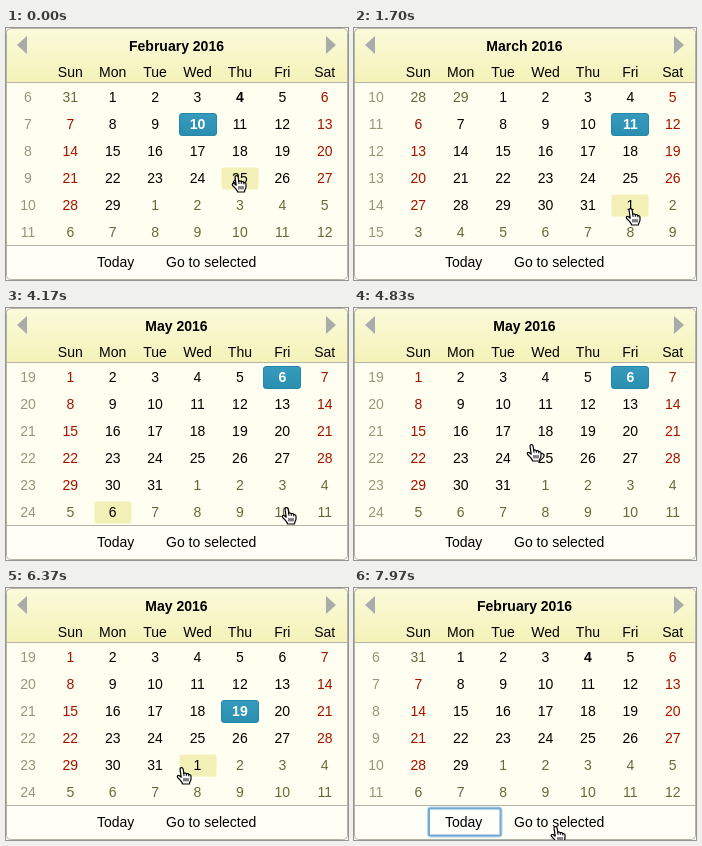
An HTML page that plays this animation: 342x252 px, repeating every 8000 ms.

```html
<!DOCTYPE html>
<html lang="en">
<head>
<meta charset="utf-8">
<title>Date picker</title>
<style>
html, body { margin: 0; width: 100%; height: 100%; overflow: hidden; background: #fff; }
svg { display: block; width: 342px; height: 252px; font: 14px "Liberation Sans", Arial, sans-serif; }
.mid { text-anchor: middle; }
.bold, .today, .sel { font-weight: bold; }
.week { fill: #97977c; }
.weekend { fill: #a61200; }
.other { fill: #68683f; }
.hover { fill: #000; }
.sel { fill: #fff; }
rect.hover { fill: #f2f0b6; }
rect.sel { fill: url(#blue); stroke: #2787a8; }
rect.plain { fill: none; }
.line { stroke: #b4b4a6; fill: none; }
</style>
</head>
<body>
<svg id="stage" viewBox="0 0 342 252">
  <defs>
    <linearGradient id="head" x2="0" y2="1">
      <stop stop-color="#fbfadb"/><stop offset="1" stop-color="#f4f2b8"/>
    </linearGradient>
    <linearGradient id="blue" x2="0" y2="1">
      <stop stop-color="#379bbd"/><stop offset="1" stop-color="#2a8eb0"/>
    </linearGradient>
    <clipPath id="frame"><rect x=".5" y=".5" width="341" height="251" rx="4"/></clipPath>
  </defs>
  <g clip-path="url(#frame)">
    <rect width="342" height="252" fill="#fffff1"/>
    <rect width="342" height="55" fill="url(#head)"/>
    <rect y="217" width="342" height="35" fill="#fffff8"/>
    <path class="line" d="M0 54.5H342M0 217.5H342"/>
  </g>
  <rect class="line" x=".5" y=".5" width="341" height="251" rx="4"/>
  <path fill="#aaa" d="M11 17L21 8V26ZM330 17L320 8V26Z"/>
  <text id="title" class="mid bold" x="170.5" y="23"></text>
  <g id="grid"></g>
  <g id="focus" fill="none">
    <rect x="75" y="220.5" width="71.5" height="27" rx="2" stroke="#b9d6ec" stroke-width="4"/>
    <rect x="75" y="220.5" width="71.5" height="27" rx="1" fill="#fffffa" stroke="#74aad6" stroke-width="2"/>
  </g>
  <text x="91" y="239">Today</text>
  <text x="160" y="239">Go to selected</text>
  <g id="hand" stroke="#000" stroke-linejoin="round" stroke-linecap="round">
    <path fill="#fff" stroke-width="1.2" d="M4 2C4 .2 6.8 .2 7.1 2L7.8 6.4C8.6 5.6 10 5.9 10.3 6.9C11.2 6.2 12.5 6.6 12.8 7.7C14 7.3 15 8 15 9.4V12C15 13.6 13.6 14.6 13.4 17H6.6C6.4 15 3.6 12.8 1.6 10.4C.6 9 2 7.9 3.4 8.8L5.2 10.2Z"/>
    <path fill="none" d="M8 11.5V14M10 11.5V14M12 11.5V14M7.8 6.4L8 8.5M10.3 6.9V8.5M12.8 7.7V9"/>
  </g>
</svg>
<script>
const LOOP = 8000, DAY = 864e5, YEAR = 2016;
const MONTHS = ['January', 'February', 'March', 'April', 'May'];
const $ = id => document.getElementById(id);
const colX = c => 64.3 + 42.4 * c, rowY = r => 69 + 27 * r;

// time, x, y of the hand
const path = [
  [0, 225, 147], [200, 225, 147], [870, 263, 193], [1000, 263, 193],
  [1690, 271, 180], [3330, 271, 180], [4130, 275, 199], [4370, 275, 199],
  [5030, 143, 118], [5400, 143, 118], [5730, 229, 122], [6030, 229, 122],
  [6700, 115, 233], [7400, 115, 233], [7970, 196, 238], [LOOP, 196, 238]
];
// time, shown month, selected month, selected day
const clicks = [
  [0, 2, 2, 10], [100, 2, 2, 25], [970, 3, 3, 11], [2400, 4, 4, 1], [2930, 4, 4, 29],
  [4170, 5, 5, 6], [5270, 5, 5, 17], [5870, 5, 5, 19], [7170, 2, 5, 19]
];
// from, to, cell that stays highlighted until the hand moves
const sticky = [[2400, 2530, 35], [4170, 4370, 36]];

function add(tag, attrs, text = '') {
  const el = document.createElementNS('http://www.w3.org/2000/svg', tag);
  for (const k in attrs) el.setAttribute(k, attrs[k]);
  el.textContent = text;
  return $('grid').appendChild(el);
}

['Sun', 'Mon', 'Tue', 'Wed', 'Thu', 'Fri', 'Sat'].forEach((name, c) =>
  add('text', { class: 'mid', x: colX(c), y: 49 }, name));
const weeks = [], cells = [];
for (let r = 0; r < 6; r++) {
  weeks.push(add('text', { class: 'mid week', x: 22, y: rowY(r) + 5 }));
  for (let c = 0; c < 7; c++) {
    const x = colX(c), y = rowY(r);
    cells.push({
      box: add('rect', { x: Math.round(x - 19) + .5, y: y - 11 + .5, width: 37, height: 22, rx: 2.5 }),
      label: add('text', { x, y: y + 5 })
    });
  }
}

function handAt(t) {
  const i = path.findIndex(p => p[0] > t), [t0, x0, y0] = path[i - 1], [t1, x1, y1] = path[i];
  const u = (t - t0) / (t1 - t0), e = u * u * (3 - 2 * u);
  return [Math.round(x0 + (x1 - x0) * e), Math.round(y0 + (y1 - y0) * e)];
}

function hovered(t, x, y) {
  const held = sticky.find(s => t >= s[0] && t < s[1]);
  if (held) return held[2];
  const c = Math.round((x - colX(0)) / 42.4), r = Math.round((y - rowY(0)) / 27);
  const inside = c >= 0 && c < 7 && r >= 0 && r < 6 &&
    Math.abs(x - colX(c)) < 19 && Math.abs(y - rowY(r)) < 11.5;
  return inside ? r * 7 + c : -1;
}

function drawGrid(month, selMonth, selDay, hover) {
  $('title').textContent = MONTHS[month - 1] + ' ' + YEAR;
  const first = new Date(Date.UTC(YEAR, month - 1, 1));
  const start = first - first.getUTCDay() * DAY;
  const week = Math.floor(((start - Date.UTC(YEAR, 0, 1)) / DAY + 5) / 7) + 1;
  weeks.forEach((el, r) => el.textContent = week + r);
  cells.forEach(({ box, label }, i) => {
    const date = new Date(start + i * DAY), m = date.getUTCMonth() + 1, d = date.getUTCDate();
    const state = m === selMonth && d === selDay ? 'sel' : i === hover ? 'hover' : 'plain';
    const kind = m !== month ? 'other' : i % 7 % 6 === 0 ? 'weekend' : m === 2 && d === 4 ? 'today' : '';
    box.setAttribute('class', state);
    label.setAttribute('class', `mid ${kind} ${state}`);
    label.textContent = d;
  });
}

let shown = '';
function frame() {
  const t = performance.now() % LOOP, [x, y] = handAt(t);
  const view = [...clicks.filter(c => c[0] <= t).pop().slice(1), hovered(t, x + 5, y + 1)];
  if (shown !== view.join()) {
    shown = view.join();
    drawGrid(...view);
  }
  $('focus').setAttribute('visibility', t >= 7070 ? 'visible' : 'hidden');
  $('hand').setAttribute('transform', `translate(${x} ${y})`);
  requestAnimationFrame(frame);
}
frame();
</script>
</body>
</html>
```
